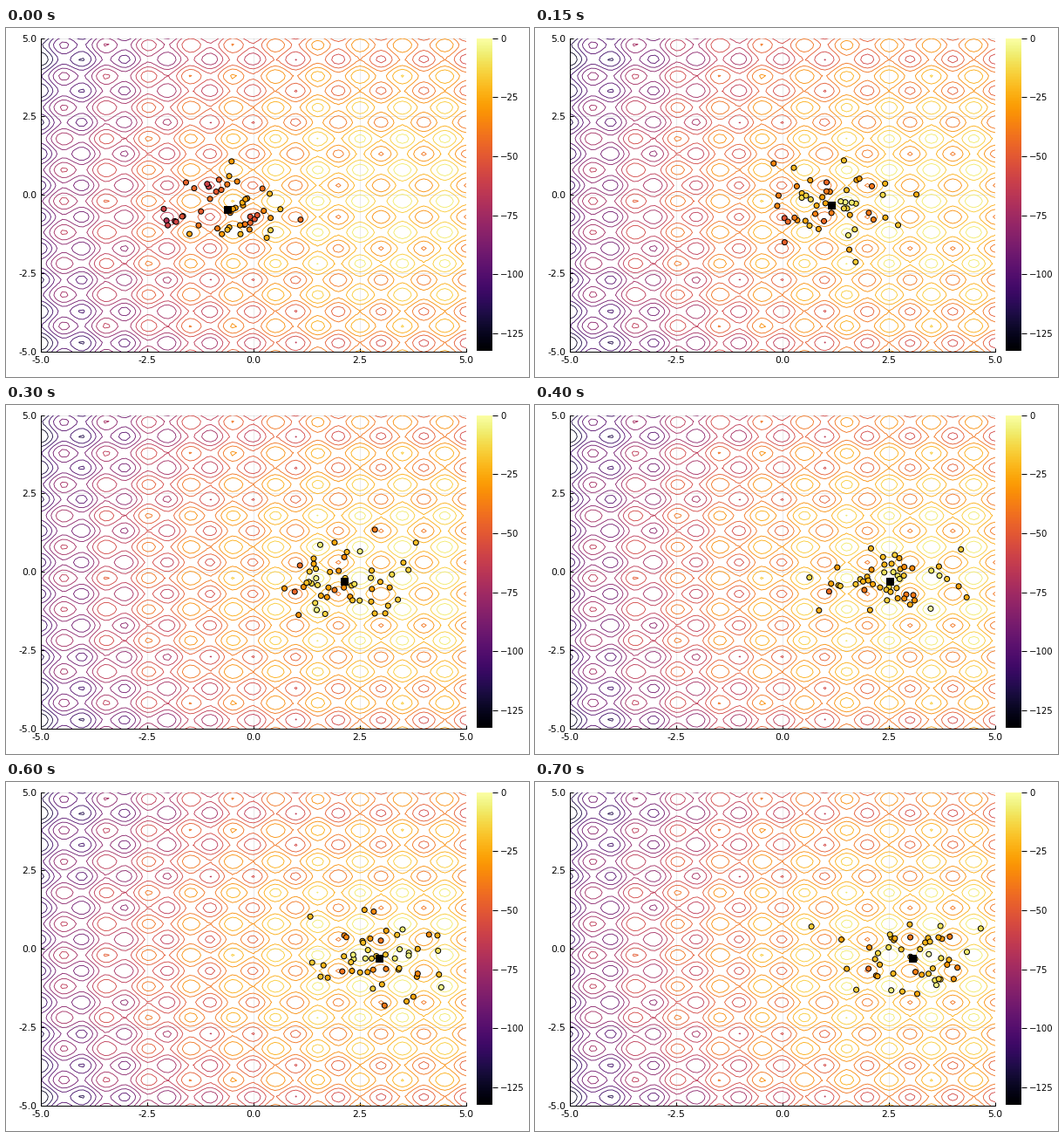
Write a matplotlib script that moves like this. It is 600 px wide and 400 px high and loops after 750 ms.

```python
import numpy as np
import matplotlib.pyplot as plt
from matplotlib.animation import FuncAnimation

W, H, DPI = 600, 400, 100
PX = 72 / DPI  # one pixel in points
GENERATIONS, POPULATION = 15, 50
CENTER = (3.5, -0.2)
START, GOAL = np.array([-.61, -.47]), np.array([3.3, -.29])
SPREAD = (.78, .66)

plt.rcParams.update({"font.family": "DejaVu Sans", "font.size": 10.7 * PX})


def rastrigin(x, y):
    """Negated, shifted Rastrigin function with its maximum of 0 at CENTER."""
    total = 20
    for d in (x - CENTER[0], y - CENTER[1]):
        total = total + d**2 - 10 * np.cos(2 * np.pi * d)
    return -total


def mean_at(gen):
    """The search mean closes in on GOAL, faster in y than in x."""
    return GOAL + (START - GOAL) * np.exp(-gen / np.array([5, 2]))


def population(gen):
    rng = np.random.default_rng(70 + gen)
    offsets = rng.normal(0, SPREAD, (POPULATION, 2))
    return mean_at(gen) + offsets - offsets.mean(axis=0)


def add_axes(left, top, right, bottom):
    box = [left / W, 1 - bottom / H, (right - left) / W, (bottom - top) / H]
    return fig.add_axes(box)


fig = plt.figure(figsize=(W / DPI, H / DPI), dpi=DPI, facecolor="white")

grid = np.linspace(-5, 5, 101)
gx, gy = np.meshgrid(grid, grid)
z = rastrigin(gx, gy)
low, high = z.min(), 0
levels = np.linspace(low, high, 17)[1:-1]
colors = dict(cmap="inferno", vmin=low, vmax=high)

# Main plot
ax = add_axes(40, 11.5, 528, 371)
ax.contour(gx, gy, z, levels, linewidths=.85 * PX, zorder=2, **colors)
ax.set(xlim=(-5, 5), ylim=(-5, 5))
ticks = np.linspace(-5, 5, 5)
labels = [f"{t:.1f}" for t in ticks]
ax.set_xticks(ticks, labels)
ax.set_yticks(ticks, labels)
ax.tick_params(direction="in", length=4 * PX, width=PX)
ax.tick_params(axis="x", pad=5 * PX)
ax.tick_params(axis="y", pad=4.5 * PX)
ax.grid(color="black", alpha=.1, linewidth=.8 * PX)
ax.set_axisbelow(True)
ax.spines[["top", "right"]].set_visible(False)
ax.spines[["left", "bottom"]].set_linewidth(PX)

# Colour bar
bar = add_axes(540, 11.5, 558, 370.5)
bar.imshow(np.linspace(low, high, 256)[:, None], aspect="auto", origin="lower",
           extent=(0, 1, low, high), **colors)
bar.set_xticks([])
bar.set_yticks(range(-125, 1, 25))
bar.yaxis.tick_right()
bar.tick_params(axis="y", length=6 * PX, width=PX, pad=3 * PX,
                labelsize=10.1 * PX)
bar.spines[:].set_visible(False)

members = ax.scatter([], [], c=[], s=(6 * PX)**2, edgecolors="black",
                     linewidths=PX, zorder=4, **colors)
mean_mark, = ax.plot([], [], "s", color="black", markersize=7.5 * PX,
                     markeredgewidth=PX, zorder=5)


def update(gen):
    points = population(gen)
    members.set_offsets(points)
    members.set_array(rastrigin(*points.T))
    x, y = mean_at(gen)
    mean_mark.set_data([x], [y])
    return members, mean_mark


anim = FuncAnimation(fig, update, frames=GENERATIONS, interval=50,
                     repeat=True, repeat_delay=0)
plt.show()
```
